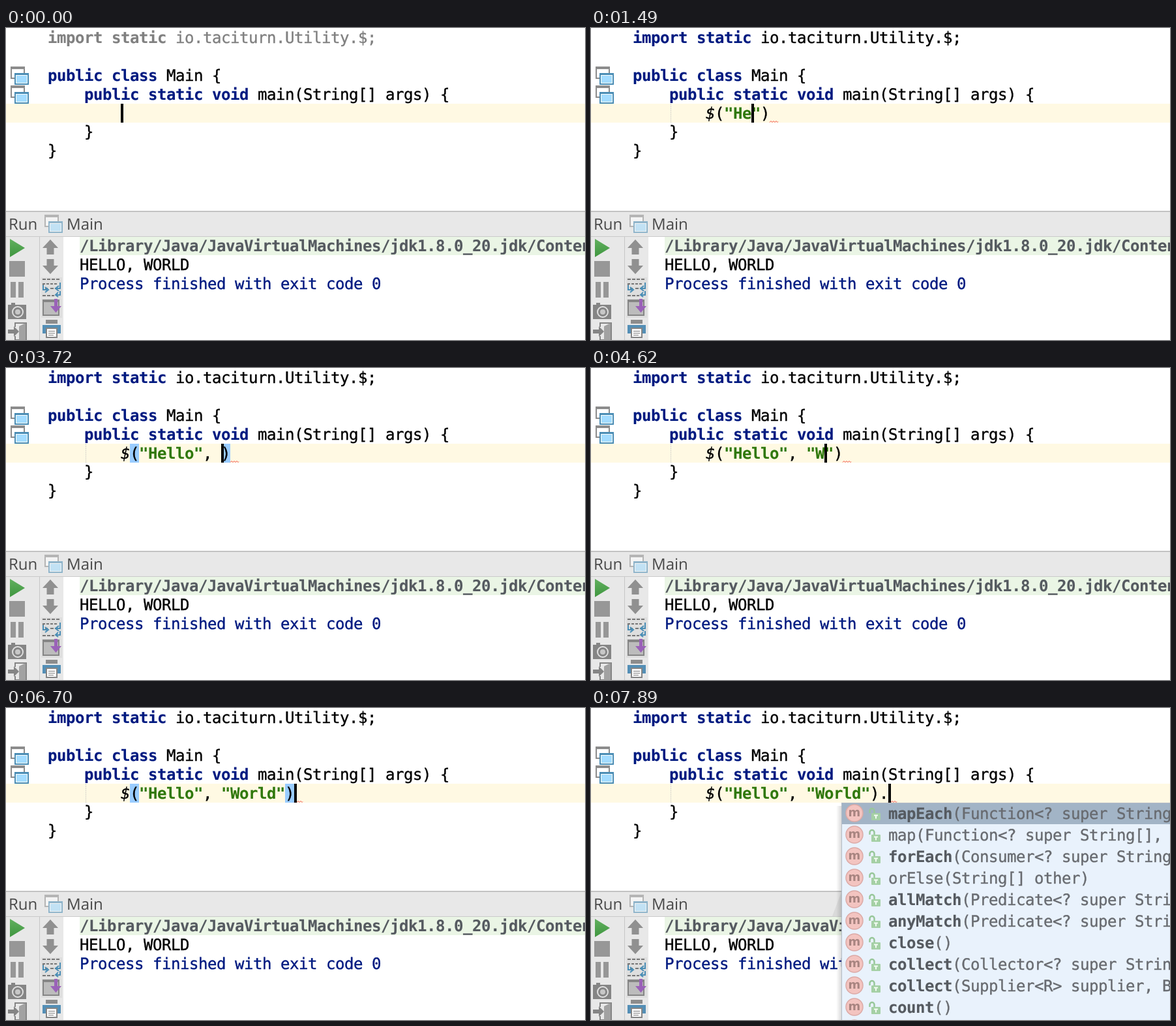
Animation of 888x478 px, one loop 8000 ms. Source, as an HTML page:

```html
<!DOCTYPE html>
<html lang="en">
<head>
<meta charset="utf-8">
<title>Typing in an editor</title>
<style>
  html, body { margin: 0; width: 100%; height: 100%; overflow: hidden; background: #fff; }
  svg { display: block; }
  text {
    white-space: pre; text-rendering: geometricPrecision;
    font: 24px "DejaVu Sans Mono", monospace; letter-spacing: -.449px;
    fill: currentColor; stroke: currentColor; stroke-width: .4px;
  }
  .ui { font: 24px "Open Sans", sans-serif; letter-spacing: 0; color: #4a4a4a; stroke: none; }
  .k, .s, .b { font-weight: bold; stroke-width: .15px; }
  .k, .out { color: #001a80; }
  .s { color: #2f780c; }
  .b { color: #555a60; }
  .row { color: #686b70; }
  .i { font-style: italic; }
  .dim, .dim .k { color: #808080; }
  .m { font: bold 18px "DejaVu Sans", sans-serif; letter-spacing: 0; color: #a88480; stroke: none; text-anchor: middle; }
  .off { display: none; }
</style>
</head>
<body>
<svg width="888" height="478" viewBox="0 0 888 478">
  <defs>
    <linearGradient id="play" x1="0" y1="0" x2="0" y2="1">
      <stop offset="0" stop-color="#62b060"/><stop offset="1" stop-color="#3f963f"/>
    </linearGradient>
    <linearGradient id="shade">
      <stop offset="0" stop-color="#000" stop-opacity="0"/><stop offset="1" stop-color="#000" stop-opacity=".14"/>
    </linearGradient>
    <g id="win">
      <rect x="1" y="1" width="20" height="17" fill="#fff" stroke="#8c8c8c" stroke-width="2"/>
      <path d="M0 2h22" stroke="#8c8c8c" stroke-width="4"/>
      <rect x="7" y="11" width="20" height="16" fill="#fff" stroke="#4a8db5" stroke-width="2"/>
      <path d="M6 11.5h22" stroke="#4a8db5" stroke-width="3"/>
      <rect x="9" y="14" width="16" height="11" fill="#a3dcff"/>
    </g>
    <path id="arrow" d="M0 -12L12 1H5.500V11H-5.500V1H-12Z" fill="#909090"/>
    <g id="lock" fill="none" stroke="#98c79a" stroke-width="2.500">
      <path d="M1.500 8V4.500a3.500 3.500 0 0 1 7 0V8"/>
      <rect x="4" y="8" width="14" height="11" rx="1" fill="#a5d0a5" stroke="none"/>
      <path d="M8 11.500h6M11 11.500v5" stroke="#f4fbf4" stroke-width="2"/>
    </g>
  </defs>

  <rect width="888" height="478" fill="#fff"/>
  <rect y="116" width="888" height="29" fill="#fff9e3"/>
  <path id="guide" d="M122.500 116V145" stroke="#d4d4cc" stroke-dasharray="2 1"/>
  <g id="marks" fill="#99ccff"></g>

  <text id="imp" x="64" y="22.500"><tspan class="k">import static</tspan> io.taciturn.Utility.$;</text>
  <text x="64" y="80.500"><tspan class="k">public class</tspan> Main {</text>
  <text x="120" y="109.500"><tspan class="k">public static void</tspan> main(String[] args) {</text>
  <text id="line" x="176" y="138.500"></text>
  <text x="120" y="166.500">}</text>
  <text x="64" y="195.500">}</text>
  <path id="wave" d="M0 144.500l2-2 2 2 2-2 2 2 2-2 2 2 1-1" fill="none" stroke="#f2483f"/>
  <rect id="caret" y="116" width="4" height="29"/>
  <use href="#win" x="7" y="59"/>
  <use href="#win" x="7" y="88"/>
  <g id="bulb">
    <path d="M83 132c-7-6-4-17 5-17s12 11 5 17v4h-10z" fill="#ffd95c" stroke="#c79a2c" stroke-width="1.500"/>
    <path d="M83 138h10M84 142h8" stroke="#8a8a8a" stroke-width="2.500"/>
  </g>

  <rect y="280" width="888" height="40" fill="#e8e8e8"/>
  <path d="M0 281h888" stroke="#c3c3c3" stroke-width="2"/>
  <path d="M0 319.500h888" stroke="#cacaca"/>
  <text class="ui" x="4" y="308.500">Run</text>
  <use href="#win" x="59" y="286" opacity=".55"/>
  <text class="ui" x="93" y="308.500">Main</text>

  <rect y="320" width="88" height="158" fill="#e8e8e8"/>
  <path d="M51.500 320V478" stroke="#c6c6c6"/>
  <path d="M6 323L29 337 6 351Z" fill="url(#play)"/>
  <path d="M5 357h24v24H5zM7 389h8v24H7zM19 389h8v24h-8z" fill="#979797"/>
  <g fill="none" stroke="#858585" stroke-width="2">
    <path d="M3 424h5v-3h6v3h17v22H3z" fill="#858585" stroke="none"/>
    <circle cx="18" cy="435" r="8" fill="#858585" stroke="#e0e0e0"/>
    <circle cx="18" cy="435" r="4" fill="#c8c8c8" stroke="none"/>
    <path d="M14 458v-6h17v26h-17v-6"/>
    <path d="M20 457l10-5v26H20z" fill="#a2a2a2" stroke="none"/>
    <path d="M3 462h9v-5l8 8-8 8v-5H3z" fill="#858585" stroke="none"/>
  </g>
  <use href="#arrow" x="68" y="336"/>
  <use href="#arrow" transform="translate(68 365) scale(1 -1)"/>
  <path d="M54 382h32v31H54zM54 414h32v30H54z" fill="#dedede"/>
  <g fill="none" stroke="#4a8db5" stroke-width="2">
    <path d="M56 385h27M68 399h8M56 410h18" stroke="#777" stroke-dasharray="5 2"/>
    <path d="M56 392h22M64 399h-7v-7" stroke="#777" stroke-dasharray="4 2"/>
    <path d="M83 390v9h-6M81 395l-5 4 5 4M57 394v7h6M60 397l5 4-5 4M83 403v6h-6M80 405l-4 4 4 3"/>
  </g>
  <path d="M57 417h24v23H57z" fill="#bcbcbc" stroke="#858585" stroke-width="2"/>
  <path d="M56 418h26" stroke="#858585" stroke-width="4"/>
  <path d="M74 415h5v11h6l-8.500 10-8.500-10h6z" fill="#9a62b8"/>
  <path d="M61 447h18v6H61z" fill="#8c8c8c"/>
  <path d="M56 455h28v13H56z" fill="#548fb6"/>
  <path d="M62 460h16v14H62z" fill="#fff" stroke="#858585" stroke-width="2"/>
  <path d="M65 464.500h10M65 467.500h10M65 470.500h8" stroke="#777"/>

  <rect x="113" y="320" width="775" height="28" fill="#eaf5e5"/>
  <text class="b" x="113" y="341.500">/Library/Java/JavaVirtualMachines/jdk1.8.0_20.jdk/Contents</text>
  <text x="113" y="371">HELLO, WORLD</text>
  <text class="out" x="113" y="400">Process finished with exit code 0</text>

  <g id="popup">
    <path d="M384 282L370 319H384Z" fill="#dadada"/>
    <rect x="376" y="150" width="8" height="328" fill="url(#shade)"/>
    <rect x="384" y="145" width="504" height="333" fill="#e9f2fc"/>
    <rect x="384" y="145" width="504" height="33" fill="#a2b4c6"/>
    <path d="M384.500 145V478M384 145.500H888" stroke="#b3bcc6"/>
  </g>
</svg>
<script>
const $ = id => document.getElementById(id);
const esc = s => s.replace(/</g, '&lt;');
const LOOP = 8000, X = 176, CELL = 14;

// Completion rows; a leading * marks a bold name.
const methods = [
  '*mapEach(Function<? super String[]', 'map(Function<? super String[], ',
  '*forEach(Consumer<? super String[]', 'orElse(String[] other)',
  '*allMatch(Predicate<? super String', '*anyMatch(Predicate<? super String',
  '*close()', '*collect(Collector<? super String', '*collect(Supplier<R> supplier, Bi',
  '*count()', ''
];
$('popup').innerHTML += methods.map((m, i) => {
  const [, star, name, rest] = m.match(/^(\*?)(\w*)(.*)$/), y = 161 + 33 * i;
  return `<circle cx="404" cy="${y}" r="13" fill="#f3c4c0" stroke="#dcaaa6" stroke-width="1.5"/>
    <text class="m" x="404" y="${y + 5}">m</text>
    <use href="#lock" x="426" y="${y - 8}"/>
    <text class="row" x="456" y="${y + 8.5}"><tspan class="${star && 'b'}">${name}</tspan>${esc(rest)}</text>`;
}).join('');

// [time, text, caret column, flags, squiggle column (default: end of text)]
// g guide, u squiggle, r import in use, i italic call, h brace match, o caret hidden, b bulb, p popup
const full = '$("Hello", "World")';
const steps = [
  [0, '', 0, ''],
  [150, '$', 1, ''],
  [450, '$()', 2, ''],
  [740, '$("")', 3, ''],
  [890, '$("")', 3, 'gu'],
  [1190, '$("H")', 4, 'gu'],
  [1340, '$("H")', 4, 'guri'],
  [1490, '$("He")', 5, 'guri'],
  [1640, '$("Hel")', 6, 'guri'],
  [1790, '$("Hell")', 7, 'guri'],
  [2090, '$("Hello")', 8, 'guri'],
  [2990, '$("Hello")', 8, 'guriob'],
  [3280, '$("Hello")', 9, 'guri'],
  [3580, '$("Hello",)', 10, 'guri'],
  [3720, '$("Hello", )', 11, 'gurih'],
  [4170, '$("Hello", "")', 12, 'guri'],
  [4320, '$("Hello", "")', 12, 'gur'],
  [4620, '$("Hello", "W")', 13, 'guri'],
  [4920, '$("Hello", "Wo")', 14, 'guri'],
  [5220, '$("Hello", "Wor")', 15, 'guri'],
  [5370, '$("Hello", "Worl")', 16, 'guri'],
  [5510, full, 17, 'guri'],
  [5960, full, 18, 'guri'],
  [6700, full, 19, 'gurih'],
  [7450, full, 19, 'gurihb'],
  [7600, full + '.', 20, 'guri', 19],
  [7740, full + '.', 20, 'guri'],
  [7890, full + '.', 20, 'gurip']
];

const show = (id, on) => $(id).classList.toggle('off', !on);
const cell = col => `<rect x="${X + col * CELL}" y="116" width="${CELL}" height="29"/>`;

function draw([, text, caret, flags, wave = text.length]) {
  const has = f => flags.includes(f);
  $('line').innerHTML = (text.match(/"[^"]*"|\$|[^"$]+/g) || []).map(t => {
    const kind = t[0] === '"' ? 's' : t === '$' && has('i') ? 'i' : '';
    return `<tspan class="${kind}">${t}</tspan>`;
  }).join('');
  $('marks').innerHTML = has('h') ? cell(1) + cell(text.indexOf(')')) : '';
  $('caret').setAttribute('x', X + caret * CELL);
  $('wave').setAttribute('transform', `translate(${X + wave * CELL})`);
  $('imp').classList.toggle('dim', !has('r'));
  show('guide', has('g'));
  show('wave', has('u'));
  show('caret', !has('o'));
  show('bulb', has('b'));
  show('popup', has('p'));
}

let last;
const start = performance.now();
function tick(now) {
  const t = Math.max(0, now - start) % LOOP;
  const step = steps.filter(s => s[0] <= t).pop();
  if (step !== last) draw(last = step);
  requestAnimationFrame(tick);
}
tick(start);
</script>
</body>
</html>
```
